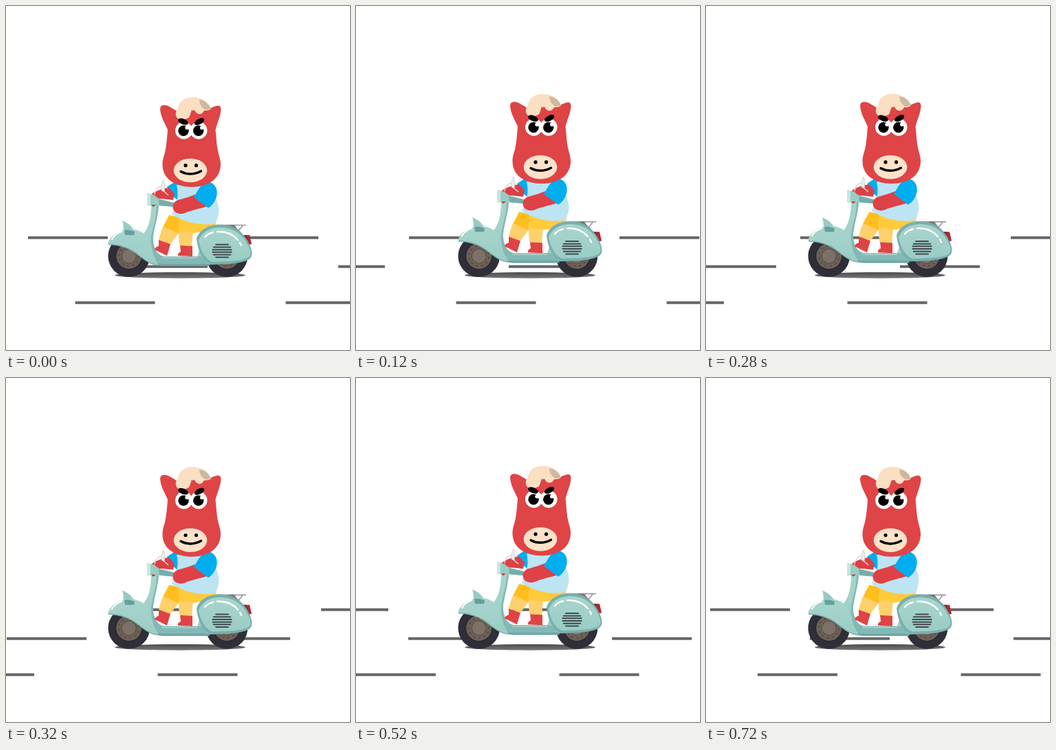
An HTML page for the animation above (0.76 s loop, 500 px wide and 500 px high).

```html
<!DOCTYPE html>
<html lang="en">
<head>
<meta charset="utf-8">
<title>Scooter ride</title>
<style>
html, body { margin: 0; width: 100%; height: 100%; overflow: hidden; background: #fff; }
svg { display: block; width: 100vw; height: 100vh; }
</style>
</head>
<body>
<svg viewBox="0 0 500 500">
  <defs>
    <linearGradient id="shade" x2="0" y2="1">
      <stop offset="0" stop-color="#4c4c50"/><stop offset="1" stop-color="#777"/>
    </linearGradient>
    <linearGradient id="mint" x2="0" y2="1">
      <stop offset="0" stop-color="#a7d5cc"/><stop offset="1" stop-color="#9bcdc5"/>
    </linearGradient>
    <g id="wheel">
      <circle r="30.3" fill="#302e39"/>
      <circle r="20" fill="#29272f"/>
      <circle r="18.5" fill="#6d6057"/>
      <circle r="14.5" fill="none" stroke="#4f4742" stroke-width="1.6" stroke-dasharray="3 4.59"/>
      <circle r="10.5" fill="#7d7067" stroke="#574d47"/>
    </g>
  </defs>

  <g id="road" stroke="#666" stroke-width="4"></g>
  <ellipse cx="253" cy="391.3" rx="95" ry="4.4" fill="url(#shade)"/>
  <g class="spin" data-x="178.7"><use href="#wheel"/></g>
  <g class="spin" data-x="321"><use href="#wheel"/></g>

  <g id="ride">
    <!-- far arm -->
    <path d="M234 263L246 255Q254 258 254 268L251 284L242 276Z" fill="#00adef"/>
    <path d="M237 264L245 273L243 282Q230 280 214 280Q207 276 215 271Q226 265 237 264Z" fill="#dd4044"/>

    <!-- rack and tail light -->
    <path d="M304 318.500H349M328 327L333 319M337 328L344 319" fill="none" stroke="#9b9b9f" stroke-width="1.700"/>
    <path d="M305 320L331 318L341 329L318 330Z" fill="#77777c"/>
    <path d="M344 333L354 333L357 346L350 348Z" fill="#b3262e"/>
    <path d="M344 333L349 333L353 347.500L348 347Z" fill="#71232c"/>

    <!-- frame and floor -->
    <path d="M211 289L222 290C221 305 215 321 213 335C212 350 220 363 230 364H278L285 342L302 374L290 378H228C214 377 208 367 202 357L196 335C207 326 211 309 211 289Z" fill="url(#mint)"/>
    <path d="M219 290L222 290C221 305 216 321 214 335C213 350 220 363 230 364H284L296 378H228C221 377 216 373 213 368C218 366 209 350 211 335C213 322 219 307 219 290Z" fill="#82b8b5"/>
    <path d="M215 372Q220 375 229 375H295V378H228Q220 378 214 373Z" fill="#6da5a5"/>
    <path d="M227 366H278" stroke="#a9d5cd" stroke-width="1.600"/>

    <!-- front fender -->
    <path d="M169 312Q179 316 184 323L190 329L170 331Q172 321 169 312Z" fill="#97cbc3"/>
    <path d="M148.500 344C152 334 162 327 176 325C190 323 201 329 207 338L212 358L222 377C210 376 200 368 190 360C181 353 167 347 149 347Z" fill="url(#mint)"/>
    <path d="M149 346.500C167 347 181 353 190 360C200 368 210 376 222 377" fill="none" stroke="#7bb0ad" stroke-width="1.400"/>
    <path d="M172 326Q179 324 187 328L186 333L173 333Z" fill="#659e9f"/>
    <path d="M154 339Q158 331 168 328" fill="none" stroke="#fff" stroke-width="2.200" stroke-linecap="round"/>

    <!-- handlebar -->
    <path d="M205 272L216 275Q221 281 230 282L244 286L245 292L223 290L214 290L205 290Z" fill="#99cdc4"/>
    <path d="M222 281L244 286L245 292L223 290Z" fill="#76adab"/>
    <path d="M205 272L210 274V289L205 290Z" fill="#c5e7df"/>
    <path d="M211 289L218 289L214 292Z" fill="#bb3438"/>
    <path d="M229 253Q232 261 230 270L226 268Q225 259 229 253Z" fill="#ececef" stroke="#cfcfd4" stroke-width=".8"/>
    <path d="M216 274Q217 264 226 262M229 269L236 275" fill="none" stroke="#dcdce0" stroke-width="1.400"/>

    <!-- legs -->
    <path d="M236 307L256 308L254 326L239 346L222 340Q226 321 236 307Z" fill="#fed06c"/>
    <path d="M237 304L258 308L251 331Q240 325 229 321Z" fill="#ffbe1c"/>
    <path d="M252 310L272 326L270 349L252 348Q250 328 252 310Z" fill="#fed06c"/>
    <path d="M252 308L306 313Q303 324 289 328L272 330L252 327Z" fill="#ffcb3a"/>
    <path d="M222 340L239 346L234 363L216 354Q217 350 222 349Z" fill="#df4345"/>
    <path d="M253 348L271 349V364L250 363Q249 359 254 357Z" fill="#df4345"/>

    <!-- shirt and near arm -->
    <path d="M248 260H295C302 273 310 286 309.500 299Q308 311 303 316.500Q270 321 241 303C244 292 253 282 248 260Z" fill="#bde4f3"/>
    <path d="M275 274C268 277 260 279 254 281C245 282 241 289 243 295C245 302 255 304 262 300C269 297 280 295 293 291Z" fill="#de4146"/>
    <path d="M292 255C303 256 308 265 306.500 275C304 286 299 290 294 293.500L273 278C279 268 283 259 292 255Z" fill="#00adef"/>

    <!-- rear cowl -->
    <path d="M277 338C280 327 292 319 306 318C328 316 342 326 350 339C355 348 359 357 357 363C355 371 341 373 325 375L298 376C287 372 279 358 277 338Z" fill="#79afad"/>
    <path d="M280 341C284 330 294 323 308 322C328 321 341 330 348 341C353 349 357 357 355 362C353 368 339 370 325 371L300 372C290 368 283 357 280 341Z" fill="url(#mint)"/>
    <path d="M289 336Q293 331 301 329M307 328Q326 327 337 340M340 344L342 348" fill="none" stroke="#fff" stroke-width="2.400" stroke-linecap="round"/>
    <path id="vent" stroke="#414850" stroke-width="2" stroke-linecap="round"/>

    <!-- head -->
    <path d="M250 154C243 149 235 144 230 144Q224 144 224 150C225 162 231 170 235 180C234 193 233 204 231 213C229 220 227.500 224 227.500 230C227 251 246 263 270 263S312 251 312 230C312 224 310 219 308.500 213C306 203 306 193 304.500 180C307 170 312 160 312.500 150Q312 144 307 145C301 146 296 150 290 150L270 142Z" fill="#df4446"/>
    <path d="M249 163C245 158 247 152 250 150C250 139 260 132.500 271 132.500C286 132.500 294 140 298 149.500C295 152 291 152 288 152C285 158 279 160 273 151C269 154 270 162 262 164Q253 168 249 163Z" fill="#fbdfc3"/>
    <path d="M281 136Q294 138 298 149.500L290 151Q281 146 281 136Z" fill="#cdb99f"/>
    <path d="M270 151Q273 154 274 151Q276 158 284 160L280 163H266Z" fill="#df4446"/>
    <g fill="#fff"><circle cx="258.500" cy="181" r="12.500"/><circle cx="280" cy="181" r="12.500"/></g>
    <circle cx="258" cy="181.300" r="7.700"/><circle cx="279.700" cy="181.300" r="7.700"/>
    <g fill="#fff"><circle cx="263" cy="177" r="2.700"/><circle cx="284.700" cy="177" r="2.700"/></g>
    <ellipse cx="257.500" cy="168" rx="7.800" ry="4" transform="rotate(22 257.500 168)"/>
    <ellipse cx="281" cy="168" rx="7.800" ry="4" transform="rotate(-28 281 168)"/>
    <ellipse cx="268" cy="239" rx="24.300" ry="17.300" fill="#fde2c9"/>
    <circle cx="261" cy="231.700" r="2.600"/><circle cx="276.500" cy="231.700" r="2.600"/>
    <path d="M254 240.500Q268 248 283.500 240" fill="none" stroke="#000" stroke-width="3.400" stroke-linecap="round"/>
  </g>
</svg>
<script>
const LOOP = 760, STEP = 40, SPEED = 0.375, DASH = 116;
const rows = [
  { y: 336.7, xs: [-264, 32, 338] },
  { y: 378.7, xs: [-119, 177, 483] },
  { y: 431.2, xs: [-195, 100.5, 406.5] }
];
const find = id => document.getElementById(id);
const road = find("road"), ride = find("ride");
const wheels = document.querySelectorAll(".spin");

road.innerHTML = rows.map(({ y, xs }) =>
  `<path d="${xs.map(x => `M${x} ${y}h${DASH}`).join("")}"/>`).join("");

let slats = "";
for (let i = -2.5; i <= 2.5; i++) {
  const half = Math.sqrt(190 - (i * 4.2) ** 2);
  slats += `M${314 - half} ${356 + i * 3.7}h${half * 2}`;
}
find("vent").setAttribute("d", slats);

function draw(t) {
  const shift = t * SPEED;
  const phase = (t % 400) / 200;
  const lift = 8 * (1 - Math.abs(1 - phase));
  road.setAttribute("transform", `translate(${shift} 0)`);
  ride.setAttribute("transform", `translate(0 ${-lift})`);
  const turn = -shift / 30.3 * 180 / Math.PI;
  wheels.forEach(w =>
    w.setAttribute("transform", `translate(${w.dataset.x} 363.5) rotate(${turn})`));
}

const start = performance.now();
function tick() {
  const t = (performance.now() - start) % LOOP;
  draw(Math.floor(t / STEP) * STEP);
  requestAnimationFrame(tick);
}
draw(0);
requestAnimationFrame(tick);
</script>
</body>
</html>
```
